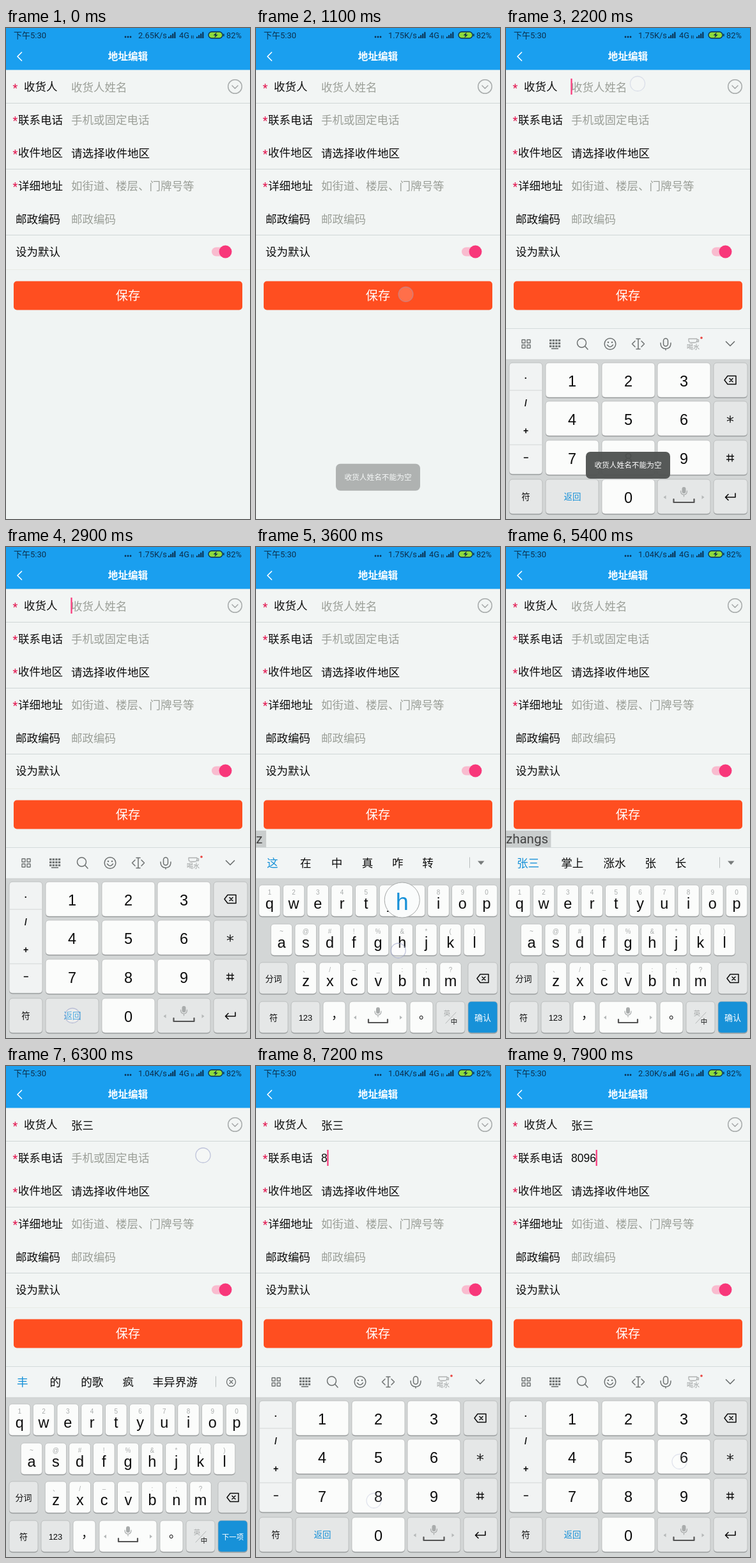
These frames come from a looping animation (382x767 px, 8000 ms). An HTML page:

```html
<!DOCTYPE html>
<html lang="zh-CN">
<head>
<meta charset="utf-8">
<title>地址编辑</title>
<style>
html, body { margin: 0; width: 100%; height: 100%; overflow: hidden; background: #f0f4f3; }
svg { display: block; width: 382px; height: 767px; }
text { font-family: "Noto Sans CJK SC", "Noto Sans CJK", "Noto Sans SC", sans-serif; }
.la { font-family: Roboto, "Noto Sans CJK SC", sans-serif; }
.key { font-family: "Liberation Sans", "Noto Sans CJK SC", sans-serif; }
</style>
</head>
<body>
<svg id="stage" viewBox="0 0 382 767" xmlns="http://www.w3.org/2000/svg"></svg>
<script>
const LOOP = 8000, STEP = 100;
const BLUE = '#1791d8', INK = '#0c0c0c', HINT = '#9b9f98', PINK = '#f8387a';

const rect = (x, y, w, h, fill, r = 0, extra = '') =>
  `<rect x="${x}" y="${y}" width="${w}" height="${h}" rx="${r}" fill="${fill}" ${extra}/>`;
const text = (s, x, cy, size, fill = INK, anchor = 'start', extra = '') =>
  `<text x="${x}" y="${cy + size * 0.37}" font-size="${size}" fill="${fill}" text-anchor="${anchor}" ${extra}>${s.replace(/&/g, '&amp;')}</text>`;
const mid = (s, x, cy, size, fill = INK, extra = '') => text(s, x, cy, size, fill, 'middle', extra);
const line = (d, color, w = 1.5, extra = '') =>
  `<path d="${d}" fill="none" stroke="${color}" stroke-width="${w}" stroke-linecap="round" stroke-linejoin="round" ${extra}/>`;
const ring = (x, y, r, color, w = 1.5) =>
  `<circle cx="${x}" cy="${y}" r="${r}" fill="none" stroke="${color}" stroke-width="${w}"/>`;
const group = (id, body) => `<g id="${id}">${body}</g>`;
const LATIN = 'class="la"', KEYS = 'class="key"';

// A key from its edges, with a soft lower shadow
const key = (x1, y1, x2, y2, fill = '#fbfcfb') =>
  rect(x1, y1 + 1.2, x2 - x1, y2 - y1, '#8f9293', 5) +
  rect(x1, y1, x2 - x1, y2 - y1, fill, 5, 'stroke="#b0b3b3" stroke-width=".7"');
const GREY = '#e5e7e7';

function statusBar() {
  const c = '#0c2f4d';
  const bars = x => [0, 1, 2, 3].map(i =>
    rect(x + i * 3.1, 13.5 - i * 2.4, 2.1, 2.5 + i * 2.4, c)).join('');
  return text('下午5:30', 12, 11.5, 13, c, 'start', LATIN) +
    [187, 191, 195].map(x => `<circle cx="${x}" cy="14" r="1.4" fill="${c}"/>`).join('') +
    `<text id="speed" ${LATIN} x="207" y="16" font-size="12.8" fill="${c}"></text>` +
    bars(254) + text('4G', 271, 11.5, 12.8, c, 'start', LATIN) +
    line('M290.5 12v4M293 12v4', c, 1) + bars(298) +
    rect(317, 6, 22, 10, '#8fdc3c', 5, `stroke="${c}" stroke-width="1.4"`) +
    `<path d="M330 6.5l-5.5 5h3.3l-1.5 4 5.5-5h-3.3z" fill="${c}"/>` +
    rect(340.2, 9, 1.4, 4, c) + text('82%', 345, 11.5, 12.8, c, 'start', LATIN);
}

function form() {
  const rows = [
    [92, '收货人', 28, 1], [143.5, '联系电话', 19, 1], [195, '收件地区', 19, 1],
    [246.5, '详细地址', 19, 1], [298.5, '邮政编码', 15, 0], [350, '设为默认', 15, 0]];
  const hints = [['如街道、楼层、门牌号等', 246.5], ['邮政编码', 298.5]];
  return rect(0, 0, 382, 767, '#f0f4f3') + rect(0, 65, 382, 312, '#f2f5f4') +
    rect(0, 0, 382, 65.5, '#1a9fef') +
    line('M24.5 38L18 44.5L24.5 51', '#fff', 1.6) +
    mid('地址编辑', 191, 44.5, 15.6, '#fff', 'font-weight="700"') +
    [117.5, 220.5, 323.5].map(y => line(`M0 ${y}H382`, '#cfd6d6', 1)).join('') +
    line('M0 377.5H382', '#e9ece6', 1) +
    rows.map(([y, s, x, must]) => (must ? text('*', 10.5, y + 1, 18, '#e3164f', 'start', LATIN) : '') +
      text(s, x, y, 17.5)).join('') +
    `<text id="name" x="102" y="98.5" font-size="17.5"></text>` +
    `<text id="phone" ${KEYS} x="102" y="150" font-size="17.5"></text>` +
    text('请选择收件地区', 102, 195, 17.6) +
    hints.map(([s, y]) => text(s, 102, y, 17.5, HINT)).join('') +
    ring(358.5, 91.5, 10.8, '#a9adad') + line('M354 90l4.5 4.5 4.5-4.5', '#a0a4a4', 1.4) +
    rect(322, 342.5, 29, 14, '#f9bccf', 7) + `<circle cx="343.5" cy="349.5" r="10" fill="${PINK}"/>` +
    rect(12, 395.5, 358, 45, '#ff4e20', 5) + mid('保存', 191, 418, 19.2, '#fff') +
    rect(101.4, 79, 2.2, 25, PINK, 0, 'id="caret"');
}

const backspace = (x, y) =>
  line(`M${x - 9} ${y}l5-6.5h13v13h-13z`, INK, 1.5) + line(`M${x - 1} ${y - 2.5}l5 5m0-5l-5 5`, INK, 1.5);

function spaceMark(x, y, half, wide) {
  return rect(x - 3, y - 16, 6, 10, '#a9acac', 3) +
    line(`M${x - 5} ${y - 10}q0 6 5 6t5-6M${x} ${y - 4}v3`, '#a9acac', 1.2) +
    line(`M${x - half} ${y + 3}v5h${half * 2}v-5`, '#555', 2.2) +
    `<path d="M${x - wide} ${y}l4-3v6zM${x + wide} ${y}l-4-3v6z" fill="#b5b8b8"/>`;
}

function toolbar() {
  const c = '#6d7171';
  let s = '';
  for (const x of [25, 33]) for (const y of [487, 495])
    s += rect(x, y, 5, 5, 'none', .5, `stroke="${c}" stroke-width="1.4"`);
  for (let r = 0; r < 3; r++) for (let i = 0; i < 4; i++)
    s += rect(68 + i * 4.6, 486.5 + r * 4.6, 3.4, 3, c);
  s += rect(71, 500, 11, 1.6, c);
  s += ring(118.5, 492, 7, c) + line('M124 497.5l4 4.5', c);
  s += ring(163, 493.5, 8.8, c) + line('M158.5 495q4.5 6 9 0', c) +
    [160, 166].map(x => `<circle cx="${x}" cy="491" r="1.2" fill="${c}"/>`).join('');
  s += line('M207 486v15M204 485.5h6M204 501.5h6M202 489l-4.5 4.5 4.5 4.5M212 489l4.5 4.5-4.5 4.5', c);
  s += rect(246.5, 485, 7, 12, 'none', 3.5, `stroke="${c}" stroke-width="1.5"`) +
    line('M242 492q0 9 8 9t8-9M250 501v2', c);
  s += line('M286 485.5h13v2q0 4-4 4h-5q-4 0-4-4zM299 487h2.5v3h-2.5', '#aeb1b1', 1.3) +
    mid('喝水', 293, 498.5, 10, '#9da0a0') + '<circle cx="306" cy="484" r="1.8" fill="#e8413c"/>';
  return s + line('M344.5 490l6.5 6.5 6.5-6.5', c, 1.7);
}

const padCols = [[62, 145], [150, 233], [237, 320]], padRows = [[523, 577], [583, 637], [644, 698], [705, 759]];
function padSpot(d) {
  const i = d === '0' ? 10 : d - 1, c = padCols[i % 3], r = padRows[i / 3 | 0];
  return [(c[0] + c[1]) / 2, (r[0] + r[1]) / 2];
}

function numPad() {
  let s = key(5, 523, 57, 697, '#f1f3f3') + line('M5 566H57M5 651H57', '#d3d6d6', 1);
  ['·', '/', '+', '−'].forEach((c, i) =>
    s += mid(c, 31, [547, 586, 629, 671][i], 14, INK, 'class="key" font-weight="700"'));
  for (const [y1, y2] of padRows) s += key(325, y1, 378, y2, GREY);
  for (const d of '1234567890') {
    const [x, y] = padSpot(d);
    s += key(x - 41.5, y - 27, x + 41.5, y + 27) + mid(d, x, y + 1, 23.5, INK, KEYS);
  }
  return s + key(5, 705, 57, 759, GREY) + mid('符', 31, 732, 13.5) +
    key(62, 705, 145, 759, GREY) + mid('返回', 104, 732, 13.5, BLUE) +
    key(237, 705, 320, 759, GREY) + spaceMark(278.5, 733, 16, 32) +
    backspace(351, 550) +
    line('M351 606v10M346.5 608.5l9 5M355.5 608.5l-9 5', INK, 1.3) +
    line('M348.5 666v11M354 666v11M345.5 669h11M345.5 674h11', INK, 1.3) +
    line('M359 727v6h-15M348 728.5l-4.5 4.5 4.5 4.5', INK, 1.6);
}

const letters = [['qwertyuiop', '1234567890', 21.3, 528], ['asdfghjkl', '~@#!%&*()', 40, 589], ['zxcvbnm', '、/–_:;?', 78, 649]];
const spots = {};
for (const [row, , x, y] of letters) [...row].forEach((c, i) => spots[c] = [x + i * 37.75, y + 24.5]);

function qwerty() {
  let s = '';
  for (const [row, subs] of letters) [...row].forEach((c, i) => {
    const [x, y] = spots[c];
    s += key(x - 16.8, y - 24.5, x + 16.8, y + 24.5) + mid(subs[i], x, y - 13.5, 10, '#a9acac', KEYS) +
      mid(c, x, y + 4, 23.5, INK, KEYS);
  });
  return s + key(5, 649, 50, 698, GREY) + mid('分词', 27.5, 674, 13) +
    key(332, 649, 378, 698, GREY) + backspace(355, 674) +
    key(5, 710, 50, 759, GREY) + mid('符', 27.5, 735, 13) +
    key(55, 710, 100, 759, GREY) + mid('123', 77.5, 735, 13, INK, KEYS) +
    key(105, 710, 140, 759) + text('，', 118, 730, 19) +
    key(146, 710, 236, 759) + spaceMark(191, 735, 15, 38) +
    key(241, 710, 277, 759) + text('。', 255, 730, 19) +
    key(282, 710, 327, 759, GREY) + mid('英', 299, 728, 10.5, '#a3a6a6') +
    line('M297 744l16-17', '#b5b8b8', 1) + mid('中', 310, 741, 10.5) +
    key(332, 710, 378, 759, BLUE) +
    '<text id="enter" x="355" y="739.5" text-anchor="middle" fill="#fff"></text>';
}

const stage = document.getElementById('stage');
stage.innerHTML = form() + statusBar() +
  group('ime', rect(0, 469, 382, 298, '#d3d6d6') + rect(0, 469, 382, 49, '#f2f5f5') +
    line('M0 469.5H382', '#d3dadb', 1) + line('M0 518H382', '#cbcfcf', 1)) +
  group('tools', toolbar()) + group('pad', numPad()) + group('abc', qwerty()) +
  group('cands', '') + group('comp', '') + group('popup', '') +
  group('toast', rect(125, 662, 132, 42, '#505352', 7) + mid('收货人姓名不能为空', 191, 683, 11.7, '#fff')) +
  '<circle id="touch" r="11.5" fill="#fff" fill-opacity=".24" stroke="#9aa0c8" stroke-opacity=".6" stroke-width="1.3"/>';
const el = {};
stage.querySelectorAll('[id]').forEach(n => el[n.id] = n);

const typed = [[3300, 'z'], [3600, 'h'], [4000, 'a'], [4400, 'n'], [4700, 'g'], [4900, 's']];
const digits = [[7100, '8'], [7300, '0'], [7600, '9'], [7800, '6']];
const taps = [[2100, 206, 87], [2900, 104, 732], [5600, 34, 493], [6300, 308.5, 139.5],
  ...typed.map(([t, c]) => [t, spots[c][0] - 6, spots[c][1] + 17]),
  ...digits.map(([t, d]) => [t, padSpot(d)[0] - 7, padSpot(d)[1] + 8])];

const words = {
  z: ['这 在 中 真 咋 转', 28.3], zh: ['这 中 真 主 转 只', 28.3], zha: ['炸 扎 眨 渣 诈 榨 闸', 26],
  zhan: ['战 站 占 展 赞 沾 粘', 26], zhang: ['张 长 章 涨 掌 账 丈', 26],
  zhangs: ['张三 掌上 涨水 张 长', 28], next: ['丰 的 的歌 疯 丰异界游', 28]
};

function candidates(id) {
  if (!id) return '';
  const [list, gap] = words[id], next = id === 'next';
  let x = 17, s = '';
  list.split(' ').forEach((w, i) => {
    s += text(w, x, 493.5, 17.6, i ? INK : BLUE);
    x += w.length * 17.6 + gap + 6 / (i + 1);
  });
  const bar = next ? 328.5 : 334.5;
  s += line(`M${bar} 485V501`, '#b9bdbd', 1);
  return s + (next ? ring(352.5, 493.5, 7, '#6d7171', 1.3) + line('M350 491l5 5m0-5l-5 5', '#6d7171', 1.3)
    : '<path d="M347 490.5h10.5l-5.25 6z" fill="#777b7b"/>');
}

const show = (n, on) => n.setAttribute('display', on ? 'inline' : 'none');
const between = (t, a, b) => t >= a && t < b;
const entered = (list, t) => list.filter(k => t >= k[0] + STEP).map(k => k[1]).join('');

function put(n, s, fill) {
  n.textContent = s;
  n.setAttribute('fill', fill);
}

function caret(t) {
  if (between(t, 2100, 2400)) return [101.4, 79];
  if (between(t, 2400, 5600)) return Math.floor((t - 2400) / 500) % 2 ? [101.4, 79] : null;
  if (between(t, 5700, 6100)) return [136.8, 79];
  if (between(t, 6400, 6800) || t >= 7100) return [101.6 + entered(digits, t).length * 9.75, 131];
  return null;
}

function touch(t) {
  if (between(t, 900, 1200)) return [234.5, 416, t < 1100 ? 1 : .8];
  const tap = taps.find(k => between(t, k[0], k[0] + 2 * STEP));
  return tap && [tap[1], tap[2], t < tap[0] + STEP ? 1 : .45];
}

function draw(time) {
  const t = Math.floor(time / STEP) * STEP;
  put(el.speed, (t < 400 ? '2.65' : t < 4200 ? '1.75' : t < 7400 ? '1.04' : '2.30') + 'K/s', '#0c2f4d');

  const named = t >= 5700, num = entered(digits, t);
  put(el.name, named ? '张三' : '收货人姓名', named ? INK : HINT);
  put(el.phone, num || '手机或固定电话', num ? INK : HINT);

  const abc = between(t, 3100, 6400), open = t >= 2200;
  const comp = named ? '' : entered(typed, t);
  const list = comp || (named && abc ? 'next' : '');
  show(el.ime, open);
  show(el.abc, abc);
  show(el.pad, open && !abc);
  show(el.tools, open && !list);
  el.cands.innerHTML = candidates(list);
  el.comp.innerHTML = comp ? rect(0, 443, 5 + comp.length * 10.9, 26, '#c9cdcd') +
    text(comp, 0, 455.5, 20.5, '#444', 'start', LATIN) : '';
  el.enter.textContent = named ? '下一项' : '确认';
  el.enter.setAttribute('font-size', named ? 11.3 : 13);

  const hit = typed.find(k => between(t, k[0], k[0] + 2 * STEP));
  el.popup.innerHTML = hit ? (([x, y]) =>
    `<circle cx="${x}" cy="${y - 62}" r="27.5" fill="#fafcfc" stroke="#a5a8a8" stroke-width="1"/>` +
    mid(hit[1], x, y - 59.5, 36, BLUE, KEYS))(spots[hit[1]]) : '';

  const c = caret(t);
  show(el.caret, c);
  if (c) {
    el.caret.setAttribute('x', c[0]);
    el.caret.setAttribute('y', c[1]);
  }

  // Toast rises while fading in, sinks while fading out
  const p = Math.max(0, Math.min(1, t < 1800 ? (t - 940) / 380 : (2600 - t) / 380));
  show(el.toast, p > 0);
  el.toast.setAttribute('opacity', p * .96);
  el.toast.setAttribute('transform', `translate(0 ${56 * (1 - p) ** 2})`);

  const f = touch(t);
  show(el.touch, f);
  if (f) {
    el.touch.setAttribute('cx', f[0]);
    el.touch.setAttribute('cy', f[1]);
    el.touch.setAttribute('opacity', f[2]);
  }
}

const start = performance.now();
function tick() {
  draw((performance.now() - start) % LOOP);
  requestAnimationFrame(tick);
}
tick();
</script>
</body>
</html>
```
